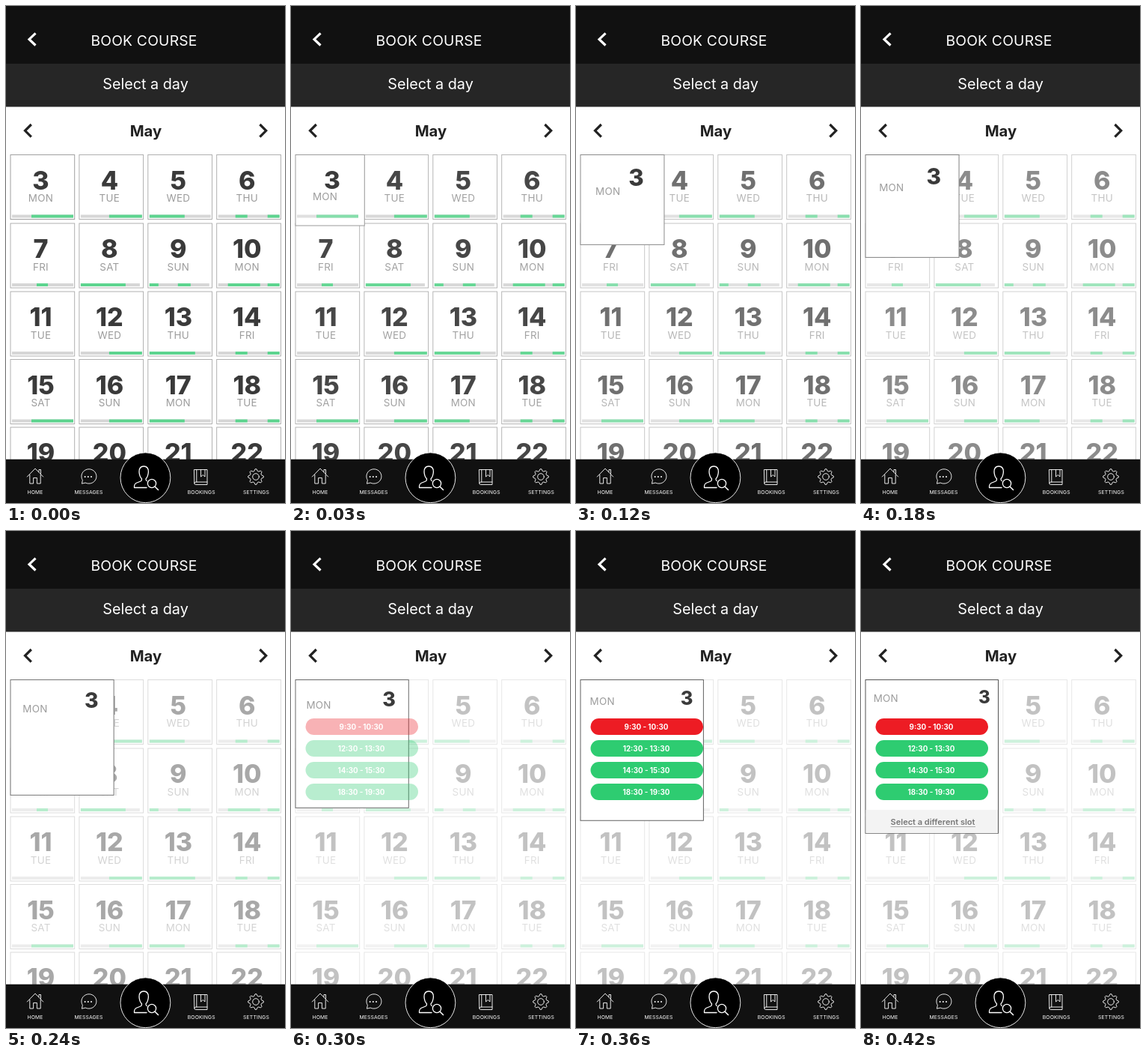
These frames come from a looping animation (373x663 px, 1090 ms). An HTML page:

```html
<!DOCTYPE html>
<html lang="en">
<head>
<meta charset="utf-8">
<title>Book course</title>
<style>
  html, body { margin: 0; width: 100%; height: 100%; overflow: hidden; background: #fff; }
  svg { display: block; width: 373px; height: 663px; font-family: Inter, "Open Sans", sans-serif; }
  text { text-anchor: middle; }
  .line { fill: none; stroke: #fff; stroke-width: .9; stroke-linejoin: round; stroke-linecap: round; }
  .chevron { fill: none; stroke: #222; stroke-width: 3.2; }
  .num { font-weight: 800; font-size: 34px; fill: #3a3a3a; }
  .day { font-size: 13.4px; letter-spacing: .3px; fill: #9c9c9c; }
  .slot { font-weight: 700; font-size: 9.8px; fill: #fff; }
  .nav { font-weight: 400; font-size: 6.8px; letter-spacing: .15px; fill: #fff; }
</style>
</head>
<body>
<svg viewBox="0 0 373 663">
  <rect width="373" height="663" fill="#fff"/>
  <rect width="373" height="77" fill="#111"/>
  <rect y="77" width="373" height="57.5" fill="#262626"/>
  <path class="chevron" style="stroke:#fff" d="M39.5 36.3L31 44.4L39.5 52.5"/>
  <text x="184.5" y="52.6" font-size="19.3" letter-spacing=".2" fill="#fff">BOOK COURSE</text>
  <text x="186.5" y="111" font-size="19.8" fill="#fff">Select a day</text>
  <path class="chevron" d="M33.8 158L25.5 166.3L33.8 174.6M339.4 158L347.7 166.3L339.4 174.6"/>
  <text x="187" y="173.7" font-size="20.3" font-weight="700" fill="#222">May</text>

  <g id="cells"></g>
  <g id="card">
    <rect id="box" x="6" y="198.5" fill="#fff"/>
    <g id="cardBar"></g>
    <text id="num" class="num">3</text>
    <text id="day" class="day">MON</text>
  </g>
  <g id="more">
    <rect x="6.5" y="372" width="176.5" height="31" fill="#f3f3f3"/>
    <text x="96" y="392.3" font-size="11" font-weight="600" fill="#777">Select a different slot</text>
    <path d="M39.5 394.5H153" stroke="#999" stroke-width=".8"/>
  </g>
  <g id="slots"></g>

  <rect y="604.7" width="373" height="58.3" fill="#111"/>
  <circle cx="186.4" cy="629.2" r="33.4" fill="#000" stroke="#fff" stroke-width=".9"/>
  <g class="line">
    <path d="M28.3 628L39 617L49.7 628M31.8 625.5V637H36.6V629.5H41.4V637H46.2V625.5M44 621.5V618.5H46.5V624"/>
    <path d="M101.5 636.8L102.4 632.6A10 9.7 0 1 1 106.5 636.2Z"/>
    <path d="M251.8 618.5H269V638.5H253.5Q251.8 638.5 251.8 636.7ZM254.8 618.5V635M251.8 636.7Q252 635 253.8 635H269M260.5 618.5V628L263.3 625.5L266 628V618.5"/>
    <path id="gear"/>
    <circle cx="334" cy="628" r="4.3"/>
    <path stroke-width="1.3" d="M188 642.5H171.5Q171 637.5 175 636L180 634Q181.8 633 181.5 630.8Q178.3 627.5 178 621.5Q178 614 184.2 614Q190.4 614 190.4 621.5Q190 627.5 187 630.8Q186.8 632.5 188.2 633.5"/>
    <circle cx="195" cy="637" r="5.6" stroke-width="1.3"/>
    <path stroke-width="1.5" d="M199.2 641.2L203.5 645.5"/>
  </g>
  <g fill="#fff">
    <circle cx="105.6" cy="628" r="1"/><circle cx="109.8" cy="628" r="1"/><circle cx="114" cy="628" r="1"/>
  </g>
  <text class="nav" x="39" y="651.3">HOME</text>
  <text class="nav" x="110.5" y="651.3">MESSAGES</text>
  <text class="nav" x="261.2" y="651.3">BOOKINGS</text>
  <text class="nav" x="334.5" y="651.3">SETTINGS</text>
</svg>
<script>
const LOOP = 1090, STEP = 30, GROW = 420;
const $ = id => document.getElementById(id);
const lerp = (a, b, p) => a + (b - a) * p;
const ramp = (t, from, to) => Math.min(1, Math.max(0, (t - from) / (to - from)));

function set(el, attrs) {
  for (const key in attrs) el.setAttribute(key, attrs[key]);
  return el;
}

function add(parent, tag, attrs, label = "") {
  const el = set(document.createElementNS("http://www.w3.org/2000/svg", tag), attrs);
  el.textContent = label;
  return parent.appendChild(el);
}

const days = ["MON", "TUE", "WED", "THU", "FRI", "SAT", "SUN"];
const rowTops = [0, 91.5, 182.5, 273, 363.5].map(y => y + 198.5);

// Free periods as [start, end] offsets along each day's bar
const late = [[26, 82]], evening = [[38, 82]], early = [[0, 47]], split = [[23, 39], [66, 82]];
const free = [
  late, evening, early, split,
  [[33, 48]], [[0, 60]], [[0, 12], [38, 55]], [[13, 56], [66, 82]],
  [], evening, [[0, 61]], split,
  late, evening, early, split
];

function drawBar(parent, x, y, spans, width = 82) {
  add(parent, "rect", { x, y, width, height: 4, fill: "#d6d6d6" });
  for (const [a, b] of spans)
    add(parent, "rect", { x: x + a, y, width: b - a, height: 4, fill: "#5dd48f" });
}

for (let i = 1; i < 20; i++) {
  const x = 6 + 91.9 * (i % 4), y = rowTops[i >> 2], cells = $("cells");
  add(cells, "rect", { x, y, width: 85.7, height: 86, fill: "#fff", stroke: "#a8a8a8", "stroke-width": .9 });
  add(cells, "text", { class: "num", x: x + 40.5, y: y + 46.1 }, i + 3);
  add(cells, "text", { class: "day", x: x + 40.5, y: y + 62.7 }, days[i % 7]);
  drawBar(cells, x + 2, y + 80, free[i] || [], i === 5 ? 79 : i === 6 ? 80 : 82);
}
drawBar($("cardBar"), 8, 278.5, late);

["9:30 - 10:30", "12:30 - 13:30", "14:30 - 15:30", "18:30 - 19:30"].forEach((label, i) => {
  const y = 250 + 29 * i, fill = i ? "#2ecc71" : "#ed1c24";
  add($("slots"), "rect", { x: 19.5, y, width: 150.5, height: 22, rx: 11, fill });
  add($("slots"), "text", { class: "slot", x: 94, y: y + 14.7 }, label);
});

// Eight-toothed cog outline
const cog = [];
for (let i = 0; i < 32; i++) {
  const a = (i - 1.5) * Math.PI / 16, r = i % 4 === 1 || i % 4 === 2 ? 10.3 : 7.9;
  cog.push((334 + r * Math.sin(a)).toFixed(2) + " " + (628 - r * Math.cos(a)).toFixed(2));
}
set($("gear"), { d: "M" + cog.join("L") + "Z" });

function draw(time) {
  const t = Math.floor((time % LOOP) / STEP) * STEP;
  const p = ramp(t, 0, GROW);
  const grey = Math.round(lerp(160, 85, p));
  set($("cells"), { opacity: lerp(1, .3, ramp(t, 0, 300)) });
  set($("box"), {
    width: lerp(85.7, 177.5, p), height: lerp(86, 204.7, p), stroke: `rgb(${grey},${grey},${grey})`
  });
  set($("cardBar"), { opacity: 1 - ramp(t, 0, 120) });
  set($("num"), { x: lerp(46.5, 165, p), y: lerp(244.6, 229.7, p) });
  $("num").style.fontSize = lerp(34, 24, p) + "px";
  set($("day"), { x: lerp(46.5, 33.3, p), y: lerp(261.2, 227.7, p) });
  set($("slots"), { opacity: ramp(t, 270, 360) });
  set($("more"), { opacity: ramp(t, 360, 420) });
}

const start = performance.now();
function tick() {
  draw(performance.now() - start);
  requestAnimationFrame(tick);
}
tick();
</script>
</body>
</html>
```
